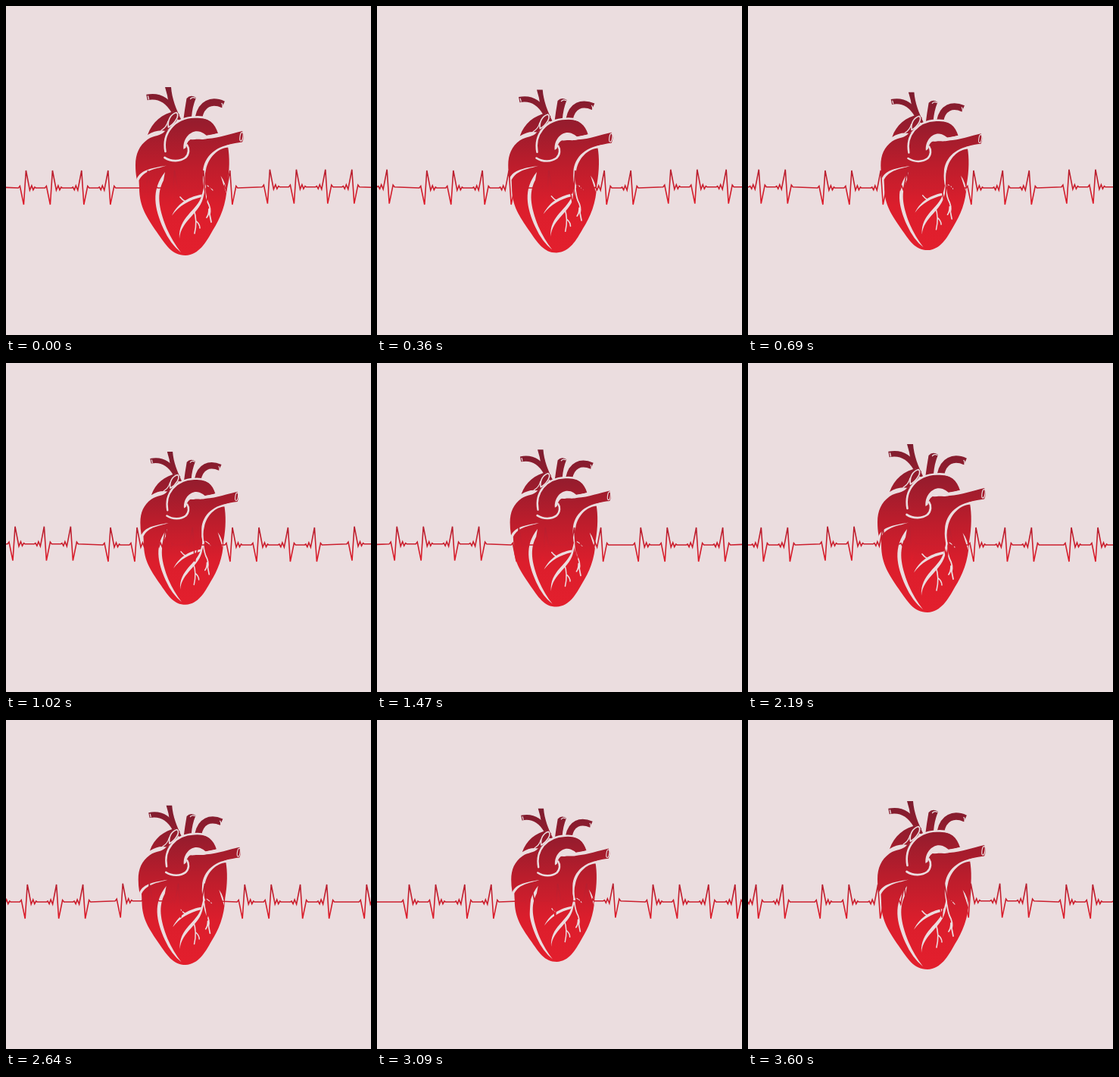
Animation, 482 px wide and 434 px high, one loop 3630 ms. Source, as an HTML page:

```html
<!DOCTYPE html>
<html lang="en">
<head>
<meta charset="utf-8">
<title>Heartbeat</title>
<style>
html, body { margin: 0; width: 100%; height: 100%; overflow: hidden; background: #ebdddf; }
svg { display: block; }
.red { fill: url(#blood); }
.tube { fill: none; stroke: url(#blood); }
.gap { fill: #ebdddf; }
.line { fill: none; stroke: #ebdddf; stroke-linecap: round; stroke-linejoin: round; }
</style>
</head>
<body>
<svg width="482" height="434" viewBox="0 0 482 434">
  <defs>
    <linearGradient id="blood" gradientUnits="userSpaceOnUse" x1="0" y1="107" x2="0" y2="329">
      <stop offset="0" stop-color="#7d1d2f"/>
      <stop offset=".22" stop-color="#991c2d"/>
      <stop offset=".45" stop-color="#bb1d2c"/>
      <stop offset=".72" stop-color="#dc1e2c"/>
      <stop offset="1" stop-color="#e31f2d"/>
    </linearGradient>
    <linearGradient id="wave" gradientUnits="userSpaceOnUse" x1="0" y1="215" x2="0" y2="263">
      <stop offset="0" stop-color="#b51f2f"/>
      <stop offset="1" stop-color="#e01d2b"/>
    </linearGradient>
  </defs>
  <rect width="482" height="434" fill="#ebdddf"/>

  <g id="heart">
    <!-- upper vessels -->
    <path class="tube" stroke-width="7.5" d="M186 120.500 C203 117 214 125 222 139"/>
    <path class="red" d="M210 107 H218 C219 122 225 137 232 151 L227 150 C225 139 214 131 213 118 Z"/>
    <path class="red" d="M238.500 122 Q244 116 251 121 Q246 133 245 147 L234 152 Q236 136 238.500 122 Z"/>
    <path class="tube" stroke-width="9.500" d="M287 130 C271 123 258 129 254.500 147"/>
    <path class="line" stroke-width="1.300" d="M187.500 119 L188.500 123 M243.500 122.500 Q246 119.500 250 121.500 M285 128.500 Q286.500 130 286 132.500"/>

    <!-- left auricle -->
    <path class="red" d="M187 170 C193 153 206 142 224 138.500 L229 143 C227 152 219 160 211 165 C203 163 195 165 187 170 Z"/>
    <path class="line" stroke-width="1.700" d="M214.500 160 C213 151 217 143 225 140.500 C230 144 223 155 214.500 160 Z"/>
    <path class="line" stroke-width="1.300" d="M205 164 Q212 160 214 152"/>

    <!-- body -->
    <path class="red" d="M210 165 C204 172 196 170 187 176 C176 184 171 195 171 210 C171 222 173 232 176 240
      C176 266 187 280 199 298 C211 315 219 329 237 329 C255 328 264 312 273 296
      C283 280 291 262 292 236 C295.500 217 295.500 199 293 185 L270 178 L243 176 L225 158 Z"/>
    <path class="red" d="M238 181 C252 172 254 178 266 175 C282 174 298 168 312 165 Q315.500 172 312 179.500 C299 181 287 184 274 192 L240 200 Z"/>
    <ellipse class="line" cx="311" cy="172.300" rx="2" ry="5.800" stroke-width="1.200" transform="rotate(9 311 172.300)"/>

    <!-- arch -->
    <path class="red" d="M209 190 C207 163 227 147 250 147 C266 146 276 154 280 168 L264 171 C253 162 236 170 236 187 L241 199 L211 201 Z"/>
    <path class="line" stroke-width="2.600" d="M210.500 192 C206 168 222 147.500 249 146.500 C262 145.500 270 149 275 154"/>
    <path class="gap" d="M234.500 189 C233 174 245 162 257 166 Q262 168 265 171 Q273 170 281 167.500 L280.500 170 Q268 176 259 174.500 C247 172 239 176 237.500 187 Z"/>
    <path class="line" stroke-width="2.700" d="M209.500 200 C219 206 230 205 237 200 C242 195 242 188 239 183.500"/>

    <!-- grooves -->
    <path class="gap" d="M303 182 C279 183 261 198 260 219 Q259 230 262 241 L264 240 Q261 226 264 216 C267 200 280 187 294 186.500 L303 186 Z"/>
    <path class="gap" d="M172 230 C176 217 190 214 212 210.500 C199 215 183 215.500 175.500 230 L176 240 L173 238 Z"/>
    <path class="gap" d="M210 219 C191 243 196 267 208 294 Q217 314 231 325 Q220 311 212 293 C201 265 199 247 208 230 Z"/>
    <path class="gap" d="M283.500 224 Q291 234 291 247 Q287 236 283.500 224 Z"/>

    <!-- coronary branches -->
    <path class="gap" d="M262 236 L258.500 250 C253 270 227 278 229 307 C231 282 257 274 261 250 L264 237 Z"/>
    <path class="gap" d="M259 248.500 C244 251 228 258 219 276.500 C229 263 242 256 258 252 Z"/>
    <path class="line" stroke-width="1.600" d="M237 258 Q233 256 230 252 M248 269 Q253 283 249 300 M251.500 284 Q256 288 256 293"/>
    <path class="line" stroke-width="1.800" d="M262 236 Q263 250 266 258 Q271 267 269 275 Q270 280 271 285 M268 268 Q268 275 265 279"/>
    <path class="line" stroke-width="1.200" d="M266 237 Q270 239 273 243"/>
  </g>

  <path id="pulse" fill="none" stroke="url(#wave)" stroke-width="1.600"/>
</svg>
<script>
const LOOP = 3630, STEP = 30, TILE = 161, SPEED = 0.1094, BASE = 240, START = 26.4;
const heart = document.getElementById('heart');
const pulse = document.getElementById('pulse');

// one beat around its peak: [dx, dy]
const beat = [[-10, 0], [-8, -2.5], [-3, 22], [0, -23], [5, 3],
              [7.5, -3], [9.5, 2.5], [11.5, -1], [13, 0]];
const mirrored = beat.map(([x, y]) => [-x, y]).reverse();

const points = [];
const add = (shape, x, y) => shape.forEach(([dx, dy]) => points.push([x + dx, y + dy]));
// every third group of beats sits slightly higher
for (let i = -4; i < 4; i++) {
  const x = i * TILE, y = (i + 6) % 3 === 2 ? BASE - 1.3 : BASE;
  add(beat, x, y);
  add(beat, x + 35, y);
  add(mirrored, x + 73.4, y);
  add(mirrored, x + 108.4, y);
}
pulse.setAttribute('d', 'M' + points.map(p => p.join(' ')).join('L'));

// amount of contraction: 0 relaxed, 1 smallest
function squeeze(t) {
  if (t < 1110) return t / 1110;
  if (t < 2190) return (2190 - t) / 1080;
  if (t < 3030) return (t - 2190) / 840;
  return Math.max(0, (3600 - t) / 570);
}

function draw(now) {
  const t = Math.floor((now % LOOP) / STEP) * STEP;
  const s = 1 - 0.099 * squeeze(t);
  heart.setAttribute('transform', `translate(241 217) scale(${s}) translate(-241 -217)`);
  pulse.setAttribute('transform', `translate(${START + SPEED * t} 0)`);
}

function tick() {
  draw(performance.now());
  requestAnimationFrame(tick);
}
tick();
</script>
</body>
</html>
```
